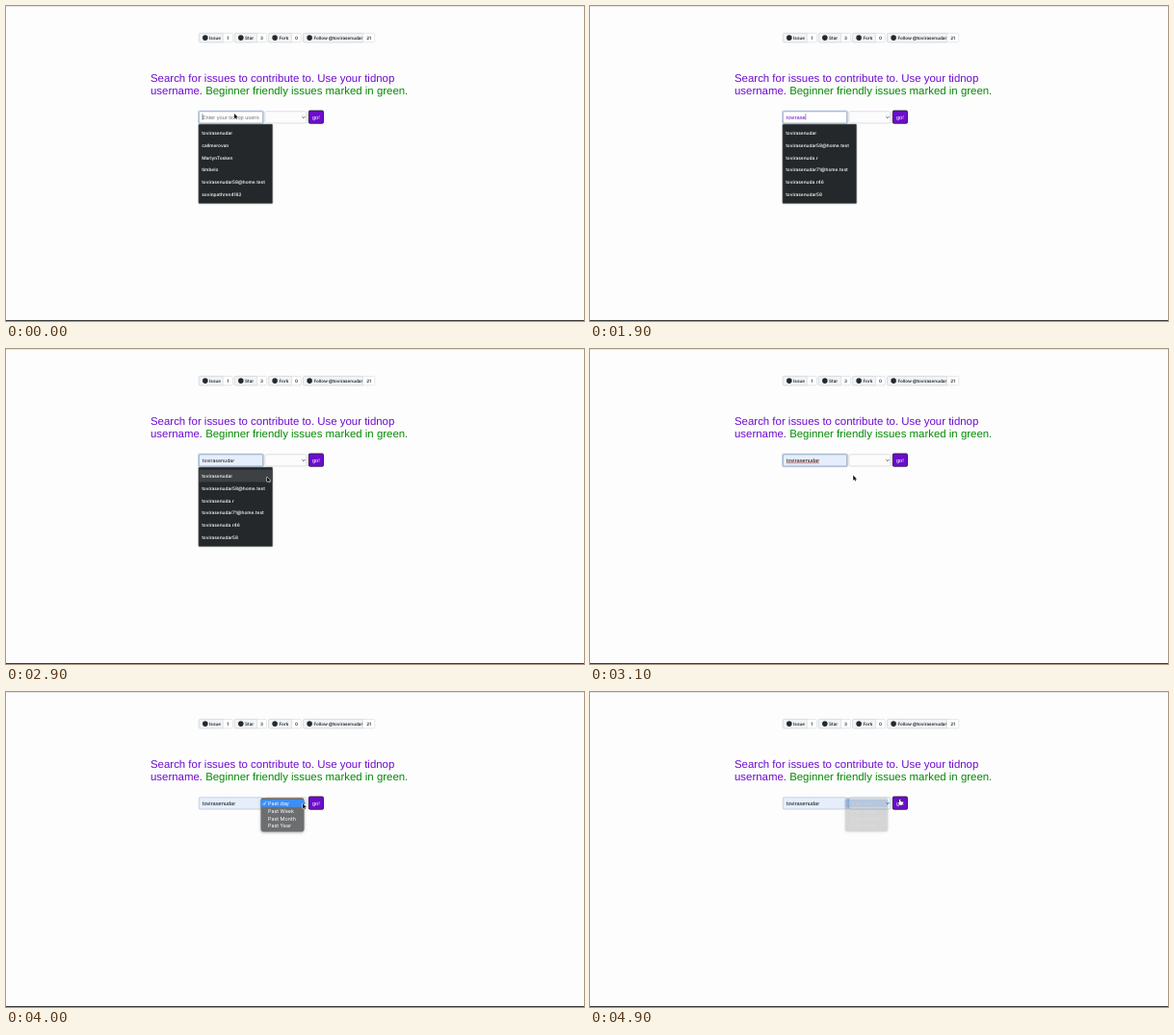
An HTML page with a canvas that plays this animation: 600x328 px, repeating every 5 s.

```html
<!DOCTYPE html>
<html lang="en">
<head>
<meta charset="utf-8">
<title>Issue finder</title>
<style>
  html, body { margin: 0; width: 100%; height: 100%; overflow: hidden; background: #fdfdfd; }
  canvas { display: block; width: 600px; height: 328px; }
</style>
</head>
<body>
<canvas id="stage"></canvas>
<script>
const canvas = document.getElementById('stage');
const ctx = canvas.getContext('2d');
const ratio = window.devicePixelRatio || 1;
canvas.width = 600 * ratio;
canvas.height = 328 * ratio;
ctx.scale(ratio, ratio);
ctx.textRendering = 'geometricPrecision';

const LOOP = 5000, STEP = 100;
const ARIAL = '"Liberation Sans", Arial, sans-serif';
const UI = 'Inter, Roboto, sans-serif';
const PURPLE = '#6d0ccf', GREEN = '#058a05';
const USER = 'tovirasenudar';
const MAILS = [USER + '58@home.test', USER + '71@home.test'];
const DOTTED = 'tovirasenuda.r';

const LISTS = {
  all: [USER, 'callmerovan', 'MarlynTosken', 'timbelo', MAILS[0], 'sovinpathren4182'],
  first: [USER, 'timbelo', MAILS[0], DOTTED, MAILS[1], DOTTED + '46'],
  more: [USER, MAILS[0], DOTTED, MAILS[1], DOTTED + '46', USER + '58']
};

// [time, characters typed]
const TYPING = [[0, 0], [800, 1], [1100, 2], [1300, 3], [1600, 4], [1700, 5], [1800, 7], [1900, 8]];

// [time, x, y] of the pointer tip
const PATH = [
  [0, 237, 112], [400, 240, 113], [2300, 241, 114], [2900, 271, 133], [3200, 274, 131],
  [3700, 310, 115.5], [4000, 308, 116], [4400, 301, 117.5], [4600, 301, 117.5], [4900, 321, 111.5]
];

function text(str, x, y, size, color, family = ARIAL, weight = 400, align = 'left') {
  ctx.font = `${weight} ${size}px ${family}`;
  ctx.textAlign = align;
  ctx.fillStyle = color;
  ctx.fillText(str, x, y);
  return ctx.measureText(str).width;
}

function box(x, y, w, h, r, fill, stroke, width = 0.7) {
  ctx.beginPath();
  ctx.roundRect(x, y, w, h, r);
  if (fill) { ctx.fillStyle = fill; ctx.fill(); }
  if (stroke) { ctx.strokeStyle = stroke; ctx.lineWidth = width; ctx.stroke(); }
}

function line(points, color, width) {
  ctx.beginPath();
  points.forEach(([x, y]) => ctx.lineTo(x, y));
  ctx.strokeStyle = color;
  ctx.lineWidth = width;
  ctx.stroke();
}

function badge(x, split, right, label, count) {
  box(x, 28.4, right - x, 9.4, 1.2, '#fff', '#d3d6d9', 0.6);
  box(x, 28.4, split - x, 9.4, [1.2, 0, 0, 1.2], '#f1f3f5', '#cfd3d6', 0.6);
  ctx.beginPath();
  ctx.arc(x + 6.5, 33.1, 2.8, 0, 7);
  ctx.fillStyle = '#24292e';
  ctx.fill();
  text(label, x + 10.8, 34.8, 4.6, '#24292e', UI, 600);
  text(count, (split + right) / 2, 34.8, 4.6, '#24292e', UI, 600, 'center');
}

function page() {
  ctx.fillStyle = '#fdfdfd';
  ctx.fillRect(0, 0, 600, 328);
  ctx.fillStyle = '#e4e4e4';
  ctx.fillRect(0, 0, 600, 1);
  ctx.fillStyle = '#3a3a3a';
  ctx.fillRect(0, 327, 600, 1);

  badge(200.3, 225.2, 235.3, 'Issue', '1');
  badge(237.3, 260.6, 270.4, 'Star', '3');
  badge(272.6, 296.5, 306.3, 'Fork', '0');
  badge(308.6, 370.4, 382.8, 'Follow @' + USER, '21');

  text('Search for issues to contribute to. Use your tidnop', 150, 78.8, 11.43, PURPLE);
  const w = text('username. ', 150, 91.7, 11.43, PURPLE);
  text('Beginner friendly issues marked in green.', 150 + w, 91.7, 11.43, GREEN);
}

function field(t, preview) {
  const filled = preview || t >= 3100;
  const focused = t < 3900;
  if (focused) box(199.8, 109.4, 67.4, 13, 1, null, '#cfe0f5', 1.6);
  box(200.3, 109.8, 66.4, 12.2, 0.8, filled ? '#e6eefc' : '#fff', focused ? '#7f93ad' : '#b9c2d2');

  ctx.save();
  ctx.beginPath();
  ctx.rect(202, 110, 61, 12);
  ctx.clip();
  if (preview) {
    text(USER, 203.8, 117.6, 5.15, '#111', UI);
  } else if (filled) {
    const w = text(USER, 203.8, 117.6, 5.68, '#111');
    if (focused) line([[203.8, 118.8], [203.8 + w, 118.8]], '#e0524d', 0.7);
  } else {
    const count = TYPING.findLast(k => t >= k[0])[1];
    const w = count
      ? text(USER.slice(0, count), 203.8, 117.6, 5.68, PURPLE)
      : (text('Enter your tidnop username', 203.8, 117.6, 5.63, '#757575'), 0);
    line([[204 + w, 112.2], [204 + w, 118.8]], '#333', 0.5);
  }
  ctx.restore();
}

function controls(t) {
  const active = t >= 4700;
  box(268.8, 109.8, 43, 12.2, 1.6, '#fcfcfd', active ? '#9dbfe6' : '#cdd0d4');
  if (active) line([[268, 110], [268, 122]], '#8fbcec', 1);
  line([[307.4, 115.1], [309, 116.7], [310.6, 115.1]], '#333', 0.8);
  box(314.3, 109, 15.2, 13.2, 1.2, PURPLE, '#29213a', 0.9);
  text('go!', 321.9, 117.6, 5.7, '#fff', ARIAL, 400, 'center');
}

function suggestions(t, hover) {
  const rows = t < 800 ? LISTS.all : t < 1100 ? LISTS.first : LISTS.more;
  box(199.8, 123, 77, 82.8, 1, '#24282a', '#7d8685', 0.6);
  if (hover) {
    ctx.fillStyle = '#3d4143';
    ctx.fillRect(200.2, 125.6, 76.2, 12.9);
  }
  rows.forEach((name, i) => text(name, 203.2, 133.8 + i * 12.87, 4.75, '#eceeee', UI, 600));
}

function menu(alpha) {
  ctx.save();
  ctx.globalAlpha = alpha;
  ctx.shadowColor = 'rgba(0,0,0,.3)';
  ctx.shadowBlur = 3 * ratio;
  ctx.shadowOffsetY = ratio;
  box(264.5, 110.3, 45, 35.2, 2.4, '#6d6e6f');
  ctx.shadowColor = 'transparent';
  ctx.fillStyle = '#3d8ef5';
  ctx.fillRect(264.5, 112, 45, 7.8);
  line([[266.8, 115.9], [268, 117.4], [270, 113.9]], '#fff', 0.7);
  ['day', 'Week', 'Month', 'Year'].forEach((unit, i) =>
    text('Past ' + unit, 272, 117.8 + i * 7.85, 5.4, '#fff', UI));
  ctx.restore();
}

function pointerAt(t) {
  const i = PATH.findLastIndex(k => t >= k[0]);
  const [t0, x0, y0] = PATH[i];
  const [t1, x1, y1] = PATH[i + 1] || [LOOP, x0, y0];
  const p = (t - t0) / (t1 - t0);
  const e = p * p * (3 - 2 * p);
  return [x0 + (x1 - x0) * e, y0 + (y1 - y0) * e];
}

function pointer(x, y, hand) {
  const shape = hand
    ? 'M0 .6Q.7-.3 1.3.6V2.4L3.6 3Q4.1 3.2 4 4L3.4 6.2H.4L-1.3 3.7Q-1.2 2.9 0 3.8Z'
    : 'M0 0V5.3L1.2 4.2L2 6L2.9 5.6L2.1 3.9H3.8Z';
  const path = new Path2D(shape);
  ctx.save();
  ctx.translate(x, y);
  ctx.lineWidth = 1;
  ctx.strokeStyle = hand ? '#222' : '#fff';
  ctx.fillStyle = hand ? '#fff' : '#111';
  ctx.stroke(path);
  ctx.fill(path);
  ctx.restore();
}

function draw(t) {
  const [x, y] = pointerAt(t);
  const listOpen = t < 3100;
  const hover = listOpen && t >= 2300 && y > 125;
  page();
  field(t, hover);
  controls(t);
  if (listOpen) suggestions(t, hover);
  if (t >= 3900) menu(t < 4800 ? 1 : t < 4900 ? 0.6 : 0.2);
  if (t < 800 || t >= 2300) pointer(x, y, x > 314);
}

const start = performance.now();
function tick() {
  const t = (performance.now() - start) % LOOP;
  draw(Math.floor(t / STEP) * STEP);
  requestAnimationFrame(tick);
}
tick();
</script>
</body>
</html>
```
